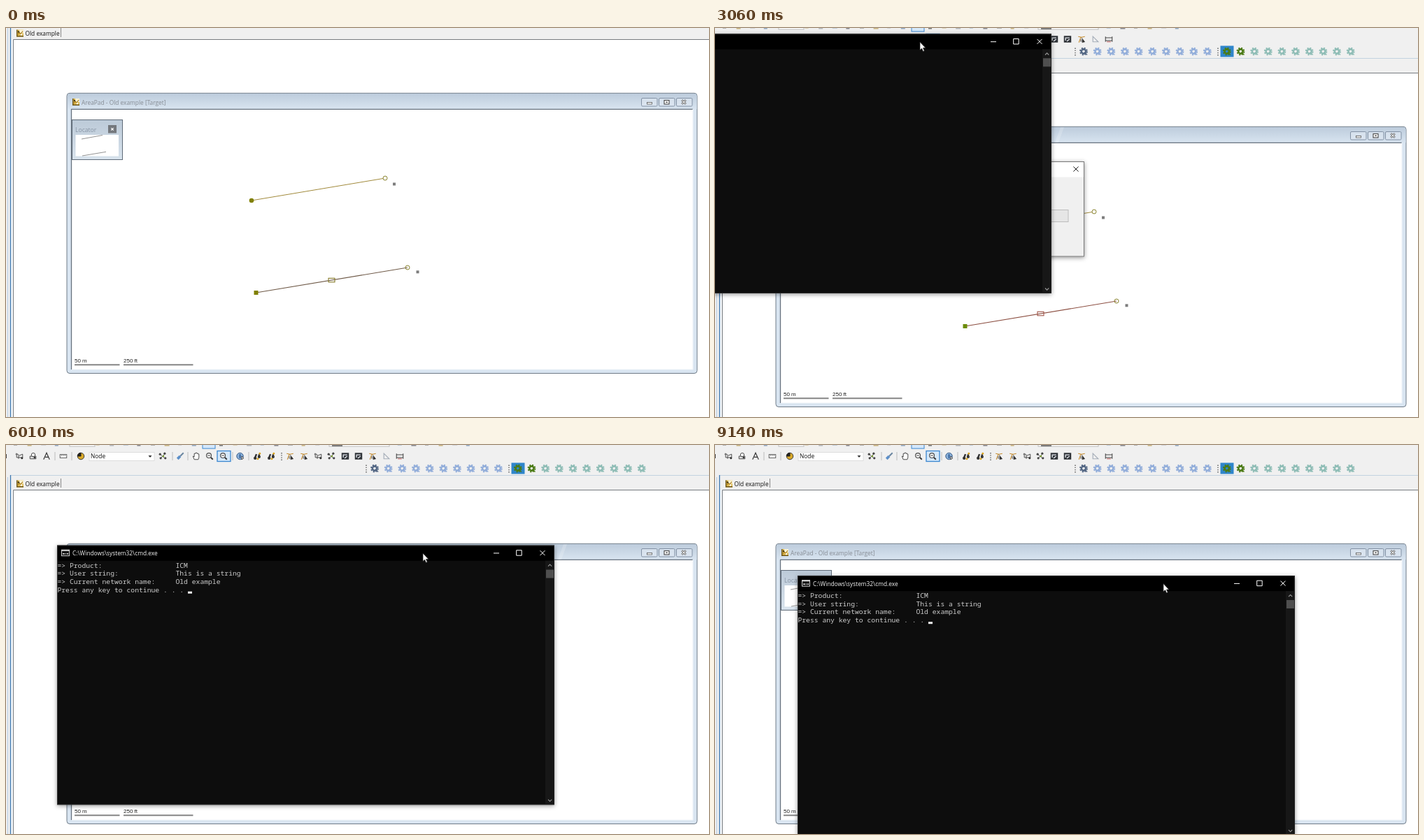
An HTML page that plays this animation: 1005x557 px, repeating every 9.6 s.

```html
<!DOCTYPE html>
<html lang="en">
<head>
<meta charset="utf-8">
<title>Script run</title>
<style>
html, body { margin: 0; width: 100%; height: 100%; overflow: hidden; background: #fff; }
svg { display: block; width: 1005px; height: 557px; }
text { font: 8.35px "Open Sans", "Noto Sans", sans-serif; white-space: pre; }
.scale { font: 8px "Liberation Sans", Arial, sans-serif; }
.mono { font: 9.72px "Noto Sans Mono", "DejaVu Sans Mono", monospace; fill: #ccc; }
</style>
</head>
<body>
<svg id="stage" viewBox="0 0 1005 557" xmlns="http://www.w3.org/2000/svg"></svg>
<script>
const LOOP = 9600;
const stage = document.getElementById('stage');

// Markup helpers
const rect = (x, y, w, h, fill, more = '') => `<rect x="${x}" y="${y}" width="${w}" height="${h}" fill="${fill}" ${more}/>`;
const path = (d, stroke, width = 1, fill = 'none', more = '') => `<path d="${d}" stroke="${stroke}" stroke-width="${width}" fill="${fill}" ${more}/>`;
const disc = (x, y, r, fill, more = '') => `<circle cx="${x}" cy="${y}" r="${r}" fill="${fill}" ${more}/>`;
const text = (x, y, s, fill = '#111', more = '') => `<text x="${x}" y="${y}" fill="${fill}" ${more}>${s}</text>`;
const group = (id, body, more = '') => `<g id="${id}" ${more}>${body}</g>`;
const move = (x, y, body) => `<g transform="translate(${x} ${y})">${body}</g>`;

const gear = (x, y, color, hole = '#f0f0f0') => move(x, y,
  disc(0, 0, 4.9, 'none', `stroke="${color}" stroke-width="2" stroke-dasharray="2.1 1.75"`) +
  disc(0, 0, 3.1, 'none', `stroke="${color}" stroke-width="2.6"`) +
  disc(0, 0, 1.4, hole) + path('M1 1L5 5', color, 1.6));

const gripDots = (x, y) => path(`M${x} ${y - 5}v11`, '#555', 1.4, 'none', 'stroke-dasharray="1.4 1.8"');

const appIcon = (x, y) => move(x, y,
  rect(0, 0, 10, 10, '#e0bd55') + rect(4, 0, 6, 5, '#fbf3d4') + path('M.7 0V10M0 9.3H10', '#6b5418', 1.4) +
  path('M2 7L4 4 6 6 9 2', '#a87b18', 1.2) + disc(3, 3, 1.2, '#3f3414') + disc(7, 7, 1.3, '#fff'));

const cross = (x, y, r, color, w = 1) => path(`M${x - r} ${y - r}L${x + r} ${y + r}M${x + r} ${y - r}L${x - r} ${y + r}`, color, w);

// Toolbar drawings, centred on 0,0
const icons = {
  net: path('M-5 -4L-1 -2V4M-4 -4V2H4M0 -1L5 -3V3', '#444', 1) + disc(-4, -3, 1.5, '#777') + disc(4, 3, 1.6, '#333'),
  db: path('M-5 4V0H4V4Z', '#444', 1, '#ddd') + disc(0, -2, 2.8, '#fff', 'stroke="#444"') + disc(2, 2, 1.4, '#333'),
  letter: path('M-4.5 5L0 -5 4.5 5M-2 1.5H3', '#333', 1.2),
  ruler: rect(-5, -2.5, 10, 5, '#fff', 'stroke="#555"') + path('M-2.5 -2v2M0 -2v2M2.5 -2v2', '#555', .8),
  pie: disc(0, 0, 5, '#d9a928', 'stroke="#333"') + path('M0 0V-5A5 5 0 0 0 -5 0Z', '#222', 1, '#222'),
  dots: path('M-4 -3L3 3M-3 3L3 -3', '#555') + [[-4, -3], [3, -4], [-3, 3], [4, 3]].map(p => disc(...p, 1.7, '#444')).join('') + disc(1, 0, 1.3, '#7aa32a'),
  brush: path('M5 -5L0 0', '#68849f', 2) + path('M0 0L-4 4', '#5c8fc9', 4),
  hand: path('M-3 5L-5 0 -3 1V-4H-1V-5H1V-4H3V-3H4V2L3 5Z', '#444', 1, '#fff'),
  zoom: disc(-1, -1, 3.6, '#fff', 'stroke="#444" stroke-width="1.2"') + path('M2 2L5 5', '#333', 2) + path('M-3 -1H1', '#333'),
  info: disc(-.5, 0, 5, '#86add7', 'stroke="#395b85"') + path('M-.5 -3V3', '#204f8c', 1.6) + path('M2 0V5L5 3Z', '#333', 1, '#fff'),
  find: path('M-3 2L-1 -3M3 1V-3', '#333', 2.6) + disc(-3, 3, 2.3, '#333') + disc(3, 1, 2.2, '#333') + disc(1, 4, 1.6, '#d8a31f') + disc(4, -4, 1.5, '#d8a31f'),
  trace: path('M-5 -4L0 -3 5 -4M-4 5L-1 -3', '#c58a2c', 1.1) + path('M0 -2L4 3M-1 0V4', '#444') + path('M1 0V5L5 4Z', '#333', .6, '#333'),
  block: rect(-5.5, -5, 11, 10, '#2f3338') + path('M-3 2V-2H3M-1 3L3 0', '#e5e8ee', 1.4),
  angle: path('M-4 4V-4L4 4Z', '#a5adb8', 1.2),
  span: path('M-5 -4V4M5 -4V4M-5 -2H5M-5 2H5', '#444', 1.1) + path('M-3 4H3', '#bd5151', 1)
};
const iconRow = [[19, 'net'], [39, 'db'], [58, 'letter'], [82, 'ruler'], [107, 'pie'], [224, 'dots'], [249, 'brush'],
  [272, 'hand'], [291, 'zoom'], [311, 'zoom'], [335, 'info'], [359, 'find'], [379, 'find'], [406, 'trace'], [426, 'trace'],
  [446, 'net'], [465, 'dots'], [485, 'block'], [504, 'block'], [524, 'trace'], [544, 'angle'], [563, 'span']];

function toolbars() {
  let s = rect(0, -60, 1005, 55, '#f0f0f0');
  // Lower ends of the row above
  for (let i = 0; i < 34; i++) {
    const x = 14 + i * 19.6;
    if ((x > 85 && x < 130) || (x > 460 && x < 555)) continue;
    s += rect(x - 3, -49, 5 + i % 3, 1.5 + i % 2, ['#777', '#b4b7bc', '#85858c', '#c8b27c', '#8fa6c0'][i * 3 % 5]);
  }
  s += rect(91, -50, 36, 4, '#fff', 'stroke="#bbb"') + rect(462, -50, 86, 4, '#fff', 'stroke="#bbb"');
  s += rect(281, -50, 18, 7, '#d5e8fa', 'stroke="#3a86d0"') + path('M466 -47H481', '#555', 1.5);
  // Main row
  s += rect(119, -37.5, 93, 12, '#fff', 'stroke="#ddd"') + text(121, -29, 'Node') + path('M203.5 -33h5l-2.5 3z', 'none', 0, '#333');
  s += rect(302, -39.5, 19, 15, '#d5e8fa', 'stroke="#3a86d0" stroke-width="1.3"');
  s += path([70, 94, 238, 260, 324, 347].map(x => `M${x} -38v12`).join(''), '#bbb') + gripDots(394, -32);
  s += rect(0, -35, 1, 6, '#444') + iconRow.map(([x, name]) => move(x, -32, `<g transform="scale(.95)">${icons[name]}</g>`)).join('');
  // Action buttons
  s += gripDots(515, -14.5) + gripDots(719, -14.5) + rect(722.5, -22.5, 19, 16, '#2f86cb', 'id="hover"');
  for (let i = 0; i < 20; i++) {
    const x = 527 + i * 19.65 + (i > 9 ? 8.3 : 0);
    const color = i === 0 ? '#536784' : i < 10 ? '#93aeda' : i < 12 ? '#4b7b16' : '#8fbdb6';
    s += gear(x, -14.5, color, i === 10 ? '#2f86cb' : '#f0f0f0');
  }
  return s;
}

function documentArea() {
  return rect(0, -5, 1005, 21.5, '#f0f0f0') + rect(0, -5, 6, 600, '#f0f0f0') + rect(6.5, 16, 4, 590, '#f4f7fa') +
    path('M2.5 -2V600', '#b4cce3') + path('M6.5 600V-5.5H1005', '#3d78b0', 1.3) +
    path('M10.5 600V16.5H1005', '#777b80') + path('M78.5 0V13', '#888') +
    appIcon(15, 2.5) + text(27.5, 10.8, 'Old example');
}

function planWindow() {
  const buttons = [908, 933, 958].map((x, i) =>
    rect(x + .5, 100.5, 22.5, 11.5, 'rgba(225,234,244,.6)', `rx="1.5" stroke="#8291a4" ${i === 2 ? 'id="shut"' : ''}`)).join('');
  const glyphs = rect(916.5, 106.5, 7, 2.5, '#fff', 'stroke="#555" stroke-width=".8"') +
    rect(941, 103.5, 7, 5.5, '#fff', 'stroke="#444" stroke-width="1.1"') + rect(943.4, 105.5, 2.3, 1.5, '#444') +
    cross(969, 106, 2.8, '#444', 2.6) + cross(969, 106, 2.6, '#fff', 1.1);
  const locator = rect(94.5, 131.5, 72, 57, 'url(#pane)', 'stroke="#5f6b78"') + text(99, 148.6, 'Locator', '#8794a4', 'style="font-size:8.6px"') +
    rect(146, 139, 12, 11.5, '#74787d') + cross(152, 144.8, 1.7, '#fff', 1.1) +
    rect(99.5, 153, 61.5, 30.5, '#fff') + path('M108 159L138 153.5M109 183L143 177.3', '#777', .8);
  const scale = text(98, 479, '50 m', '#222', 'class="scale"') + text(168, 479, '250 ft', '#222', 'class="scale"') +
    path('M98 482.3H162.5M168 482.3H267.5', '#858585', 2);
  const links = path('M351 247L542 215', '#a18a3c') + disc(351, 247, 3.3, '#6c8c0a', 'class="node"') +
    disc(542, 215, 3, '#fff', 'stroke="#8a8430"') +
    path('M357.5 379L574 343', '#8c4f42', 1.1, 'none', 'id="link"') +
    rect(461, 358.3, 9, 5.5, 'none', 'id="mark" stroke="#a05347" stroke-width="1.1"') +
    rect(354.5, 376, 6, 6, '#6c8c0a', 'class="node"') + disc(574, 343, 3, 'none', 'stroke="#8a8430"') +
    rect(553, 221.5, 4, 4, '#7d7d7d') + rect(586.5, 347.3, 4, 4, '#7d7d7d');
  return rect(87, 93.3, 901, 401.2, '#d9e5f1', 'id="frame" rx="4" stroke="#6f7b88"') +
    path('M88 116V97Q88 94 91 94H984Q987.5 94 987.5 97V116Z', 'none', 0, 'url(#idle)', 'id="bar"') +
    rect(93.5, 116, 888.5, 373, '#fff') + path('M93.5 489V116.3H982', '#67727e', 1.3) + path('M982 116V489H94', '#eef3f8') +
    appIcon(95, 101) + text(108, 109.6, 'AreaPad - Old example [Target]', '#868c94', 'id="caption"') +
    buttons + glyphs + locator + links + scale;
}

function waitDialog() {
  return rect(290, 143.5, 237.5, 135.5, '#f0f0f0', 'stroke="#777" filter="url(#shade)"') + rect(290.5, 144, 236.5, 21.5, '#fff') +
    text(296, 157.5, 'Please wait...') + cross(516, 154, 3.6, '#222') + text(307, 183.7, 'Starting...') +
    text(406, 207.3, '0 %', '#111', 'text-anchor="middle"') + rect(309.5, 212.5, 195.5, 17, '#e6e6e6', 'stroke="#bcbcbc"') +
    rect(376.5, 251.5, 61.5, 16, '#e1e1e1', 'stroke="#0b69b5" stroke-width="1.6"') +
    text(407, 262.5, 'Cancel', '#111', 'text-anchor="middle"');
}

function consoleWindow() {
  const rows = [['=&gt; Product:', 'ICM'], ['=&gt; User string:', 'This is a string'], ['=&gt; Current network name:', 'Old example']];
  const mono = (x, i, s) => text(x, 31.9 + i * 11.7, s, '#ccc', 'class="mono"');
  return rect(0, 0, 711, 371.5, '#0c0c0c', 'filter="url(#shade)"') + rect(0, 0, 711, 22, '#000') +
    rect(.5, .5, 710, 370.5, 'none', 'stroke="#3b3b3b" stroke-opacity=".7"') +
    rect(6.5, 6.5, 11, 8.5, '#111', 'stroke="#ccc"') + path('M6 7.3H18', '#ddd', 1.6) + path('M8 12h3m1 0h1m1 0h2', '#ddd', 1.4) +
    text(22, 14.4, 'C:\\Windows\\system32\\cmd.exe', '#f5f5f5') +
    path('M624 11.2H632M656.7 7h7.5v7.5h-7.5z', '#fff') + cross(694, 10.9, 3.5, '#fff') +
    rect(698, 22, 12.5, 348, '#171717') + rect(699, 34.8, 11, 12, '#4f4f4f') +
    path('M702 30l2.6-2.6 2.6 2.6M702 364l2.6 2.6 2.6-2.6', '#999', 1.1) +
    group('output', rows.map((r, i) => mono(.4, i, r[0]) + mono(169.4, i, r[1])).join('')) +
    group('prompt', mono(.4, 3, 'Press any key to continue . . . ')) + rect(187, 66, 6, 3, '#f2f2f2', 'id="caret"');
}

const gradient = (id, a, b) => `<linearGradient id="${id}" x2="0" y2="1"><stop stop-color="${a}"/><stop offset="1" stop-color="${b}"/></linearGradient>`;

stage.innerHTML = `<defs>${gradient('idle', '#bdccdc', '#d8e4f0')}${gradient('live', '#9cb8d5', '#bcd2e9')}` +
  `${gradient('pane', '#bccad8', '#d8e3ed')}${gradient('red', '#d99a8c', '#b94f3c')}` +
  '<filter id="shade" x="-10%" y="-10%" width="120%" height="125%"><feDropShadow dx="0" dy="1.5" stdDeviation="3" flood-opacity=".42"/></filter></defs>' +
  rect(0, 0, 1005, 557, '#fff') +
  group('view', documentArea() + toolbars() + planWindow() +
    path('M5 116L13 94H18L10 116Z', 'none', 0, '#fff', 'id="glint" opacity=".2"') + group('dialog', waitDialog())) +
  group('console', consoleWindow()) +
  group('mouse', disc(0, 0, 8.8, '#e8e800', 'id="halo" opacity=".55"') +
    path('M0 0V11.5L2.6 9.2 4.5 13.4 6.3 12.6 4.5 8.5H8Z', '#222', .7, '#fff', 'id="arrow"') +
    disc(1, 0, 5, 'none', 'id="busy" stroke="#168de2" stroke-width="2.4"'));

const el = Object.fromEntries([...stage.querySelectorAll('[id]')].map(e => [e.id, e]));
const nodes = stage.querySelectorAll('.node');

// Motion keys: time, x, y
const consoleKeys = [[0, -230, -14], [2999, -230, -14], [3000, -230, 8.5], [3250, -230, 8.5], [3600, -195, 30],
  [3800, -125.5, 69], [3940, 73, 143.7], [6130, 73, 143.7], [6550, 118, 187.2]];
const mouseKeys = [[0, 712, -20], [270, 712, -12], [620, 738, 12.5], [2500, 738, 12.5], [2930, 320, -3], [3000, 293, 20],
  [3250, 293, 20.5], [3600, 345, 50], [3800, 434, 95.5], [3940, 596, 155], [6130, 596, 155], [6550, 641, 198.5]];

function along(keys, t) {
  const i = keys.findIndex(k => k[0] > t);
  if (i < 0) return keys[keys.length - 1].slice(1);
  const a = keys[i - 1], b = keys[i], p = (t - a[0]) / (b[0] - a[0]);
  return [1, 2].map(n => a[n] + (b[n] - a[n]) * p);
}
const within = (t, ...spans) => spans.some(([a, b]) => t >= a && t < b);
const show = (e, on) => e.setAttribute('display', on ? 'inline' : 'none');
const place = (e, x, y) => e.setAttribute('transform', `translate(${x} ${y})`);

function draw(t) {
  const live = within(t, [70, 2100]), early = t < 70;
  const [cx, cy] = along(consoleKeys, t), [mx, my] = along(mouseKeys, t);
  const fade = t < 2440 ? (t - 2300) / 140 * .84 : .84 + (t - 2440) / 70 * .16;
  const busy = within(t, [2170, 2500]);

  place(el.view, 0, early ? 0 : t < 3000 ? 25.5 : 48);
  el.bar.setAttribute('fill', live ? 'url(#live)' : 'url(#idle)');
  el.frame.setAttribute('fill', live ? '#bad2ea' : '#d9e5f1');
  el.frame.setAttribute('stroke', live ? '#35424f' : '#6f7b88');
  el.caption.setAttribute('fill', live ? '#111' : '#868c94');
  el.shut.setAttribute('fill', live ? 'url(#red)' : 'rgba(225,234,244,.6)');
  nodes.forEach(n => n.setAttribute('fill', early ? '#808000' : '#6c8c0a'));
  el.link.setAttribute('stroke', early ? '#6f5a48' : '#8c4f42');
  el.mark.setAttribute('stroke', early ? '#857a28' : '#a05347');
  show(el.hover, t >= 420);
  show(el.dialog, within(t, [2240, 4020]));

  show(el.console, t >= 2300);
  el.console.setAttribute('opacity', Math.max(0, Math.min(1, fade)));
  place(el.console, cx, cy);
  show(el.output, t >= 4020);
  show(el.prompt, t >= 4090);
  show(el.caret, within(t, [4950, 5480], [6010, 6540], [7080, 7620], [8150, 8610], [9140, LOOP]));
  show(el.glint, within(t, [2300, 6200]));
  place(el.glint, cx + 711, 0);

  place(el.mouse, mx, my);
  show(el.halo, within(t, [2030, 2100], [3180, 4020], [6140, 7150]));
  show(el.arrow, !busy);
  show(el.busy, busy);
}

function tick(now) {
  draw(now % LOOP);
  requestAnimationFrame(tick);
}
draw(0);
requestAnimationFrame(tick);
</script>
</body>
</html>
```
